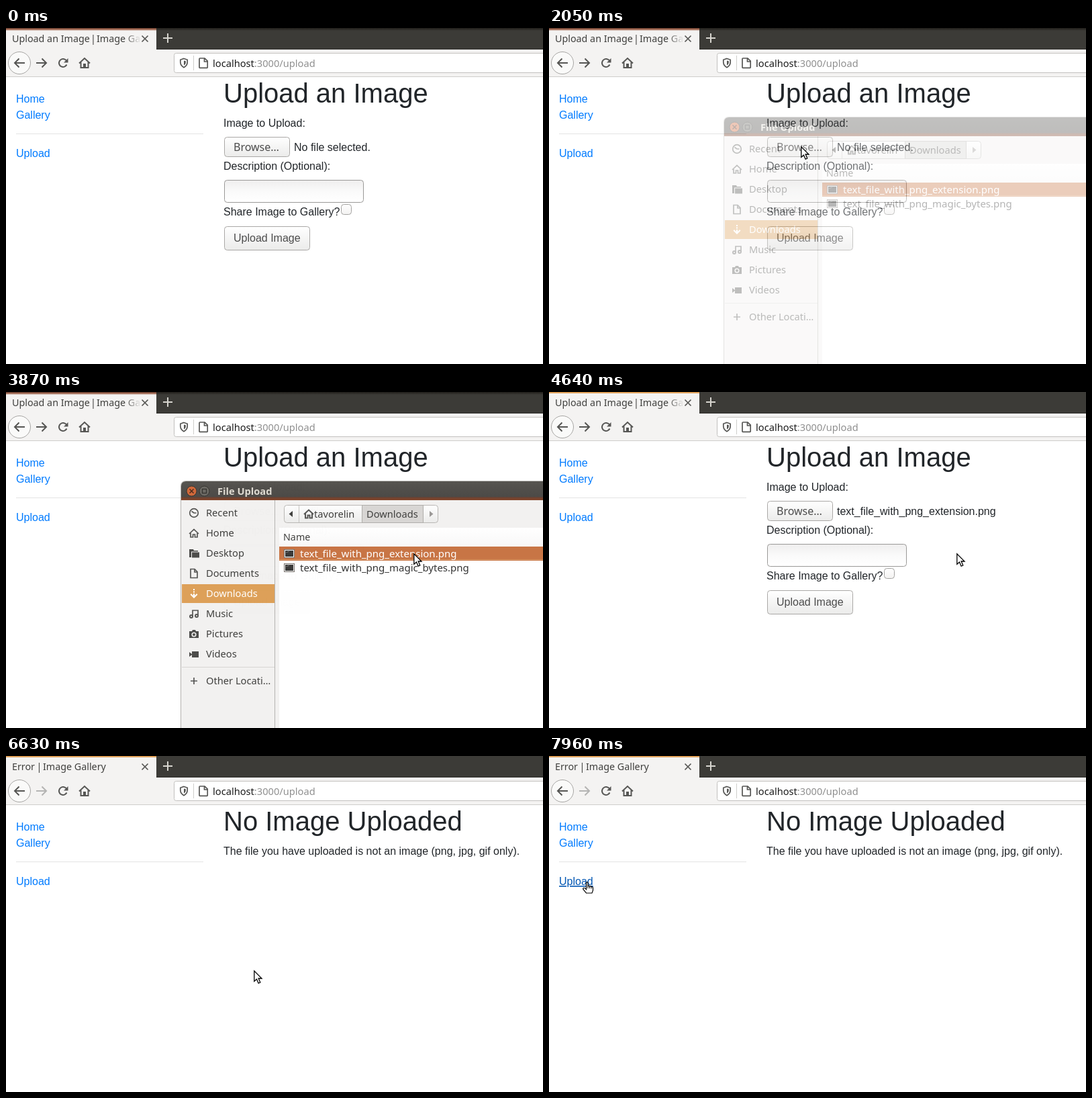
An HTML page that plays this animation: 800 by 500 pixels, repeating every 8000 ms.

```html
<!DOCTYPE html>
<html lang="en">
<head>
<meta charset="utf-8">
<title>Upload an Image</title>
<style>
  html, body { margin: 0; width: 100%; height: 100%; overflow: hidden; background: #fff; }
  svg { display: block; width: 100vw; height: 100vh; }
  text { font: 16px "Liberation Sans", Arial, sans-serif; fill: #212529; white-space: pre; }
  .ui text, text.ui { font: 14.65px "Noto Sans", "Open Sans", sans-serif; fill: #3f3f3d; }
  .ui .tab { font-size: 14.3px; }
  .ui .file { font-size: 15px; fill: #333; }
  .ui .light { fill: #fff; }
  .ui .heading { font-weight: bold; fill: #dfdbd2; }
  text.browse { font-size: 16px; fill: #4c4c4c; }
  text.h1 { font-size: 40px; }
  .link { fill: #007bff; }
  .link.hover { fill: #0056b3; text-decoration: underline; }
  .line { fill: none; stroke: #565654; stroke-width: 2; }
  .thin { stroke-width: 1.7; }
</style>
</head>
<body>
<svg viewBox="0 0 800 500">
  <defs>
    <linearGradient id="button" x2="0" y2="1"><stop stop-color="#fff"/><stop offset="1" stop-color="#ebebea"/></linearGradient>
    <linearGradient id="hover" x2="0" y2="1"><stop stop-color="#fff"/><stop offset="1" stop-color="#f3f2f1"/></linearGradient>
    <linearGradient id="pressed" x2="0" y2="1"><stop stop-color="#d2d1d0"/><stop offset="1" stop-color="#e2e1e0"/></linearGradient>
    <linearGradient id="field" x2="0" y2="1"><stop stop-color="#efeeee"/><stop offset=".5" stop-color="#fafafa"/><stop offset="1" stop-color="#fff"/></linearGradient>
    <linearGradient id="fade"><stop stop-color="#f4f3f2" stop-opacity="0"/><stop offset="1" stop-color="#f4f3f2"/></linearGradient>
    <linearGradient id="dim" x2="0" y2="1"><stop stop-color="#5c3a2e"/><stop offset=".5" stop-color="#a4654c"/><stop offset="1" stop-color="#e4dcd8"/></linearGradient>
    <linearGradient id="shade" x2="0" y2="1"><stop stop-color="#1f1d19"/><stop offset="1" stop-color="#3c3b37"/></linearGradient>
    <linearGradient id="header" x2="0" y2="1"><stop stop-color="#fff"/><stop offset="1" stop-color="#f8f7f7"/></linearGradient>
    <linearGradient id="titlebar" x2="0" y2="1"><stop stop-color="#55534f"/><stop offset=".8" stop-color="#4b4946"/><stop offset=".88" stop-color="#70402c"/><stop offset="1" stop-color="#84452c"/></linearGradient>
  </defs>
  <rect width="800" height="500" fill="#fff"/>

  <!-- browser window -->
  <g class="ui">
    <rect width="800" height="33" fill="#3c3b37"/>
    <rect y="31" width="800" height="1" fill="#2d2c29"/>
    <path d="M0 0H224V32H800V72H0Z" fill="#f4f3f2"/>
    <path d="M0 72.5H800" stroke="#cfcdcb"/>
    <rect id="accent" width="224" height="2" fill="#e0a15a"/>
    <g id="unfocused">
      <rect width="224" height="4" fill="url(#dim)"/>
      <rect x="224" width="576" height="4" fill="url(#shade)"/>
    </g>
    <g id="uploadTitle">
      <text class="tab" x="9" y="21">Upload an Image</text>
      <text class="tab" x="130" y="21" text-anchor="middle">|</text>
      <text class="tab" x="135" y="21">Image Ga</text>
      <rect x="176" y="6" width="25" height="22" fill="url(#fade)"/>
    </g>
    <g id="loadingTitle">
      <circle id="throbber" cy="16" r="2" fill="#5e5e5c"/>
      <text x="31" y="21">localhost:3000/upload</text>
    </g>
    <g id="errorTitle">
      <text class="tab" x="9" y="21">Error</text>
      <text class="tab" x="49.5" y="21" text-anchor="middle">|</text>
      <text class="tab" x="55" y="21">Image Gallery</text>
    </g>
    <path d="M202.5 11.5l9 9m0-9l-9 9" class="line thin"/>
    <path d="M234 15H248M241 8V22" class="line" style="stroke:#d6d4ce"/>

    <circle cx="20" cy="52" r="16.5" fill="#fafaf9" stroke="#a7a6a4"/>
    <path class="line" d="M28 52H13M19.5 45.5L13 52l6.5 6.5"/>
    <path id="forward" class="line" d="M45 52H60M53.5 45.5L60 52l-6.5 6.5"/>
    <g id="reload">
      <circle id="ring" class="line" cx="85" cy="52" r="6" pathLength="100"/>
      <path id="reloadTip" d="M92.5 45V51.5H86Z" fill="#565654"/>
    </g>
    <path class="line" d="M109 52.5L117 45l8 7.5M111.5 51V59H122.5V51"/>
    <rect x="115" y="53" width="4" height="6" fill="#565654"/>

    <rect x="250.5" y="37.5" width="560" height="29" rx="3" fill="#fff" stroke="#c2c0be"/>
    <path class="line thin" d="M265 45.5L270.2 47.3V51Q270 56 265 58.7Q260 56 259.8 51V47.3Z"/>
    <path d="M265 48.5L267.8 49.3V52Q267.5 54 265 55.7Z" fill="#565654"/>
    <path d="M279.5 41V63" stroke="#cfcecc"/>
    <path class="line thin" d="M289 45H296L300.2 49.2V58.5Q300.2 59.3 299.4 59.3H288.7Q288 59.3 288 58.5V46Q288 45 289 45M295.5 45V50H300"/>
    <text x="308" y="58" style="fill:#1b1b1b">localhost<tspan fill="#8f8f8f">:3000/upload</tspan></text>
  </g>

  <!-- page -->
  <text class="link" x="15" y="111">Home</text>
  <text class="link" x="15" y="135">Gallery</text>
  <path d="M15 157.5H294" stroke="#e4e4e4"/>
  <text id="uploadLink" class="link" x="15" y="192">Upload</text>

  <g id="form">
    <text class="h1" x="324" y="111">Upload an Image</text>
    <text x="324" y="147">Image to Upload:</text>
    <rect id="browse" x="325.5" y="162.5" width="97" height="29" rx="4" stroke="#aaa8a6"/>
    <text class="ui browse" x="339" y="183">Browse…</text>
    <text id="fileName" x="429" y="183"></text>
    <text x="324" y="211">Description (Optional):</text>
    <rect x="325.5" y="226.5" width="207" height="33" rx="4" fill="url(#field)" stroke="#9a9997"/>
    <text x="324" y="279">Share Image to Gallery?</text>
    <rect x="499.5" y="262.5" width="15" height="15" rx="4" fill="url(#hover)" stroke="#a3a2a0"/>
    <rect id="submit" x="325.5" y="295.5" width="127" height="35" rx="4"/>
    <text x="339" y="318" style="fill:#4c4c4c">Upload Image</text>
  </g>
  <g id="error">
    <text class="h1" x="324" y="111">No Image Uploaded</text>
    <text x="324" y="147">The file you have uploaded is not an image (png, jpg, gif only).</text>
  </g>

  <!-- file dialog -->
  <g id="dialog" class="ui">
    <path d="M260.5 510V140Q260.5 132.5 268 132.5H810V510Z" fill="#f2f1f0" stroke="#b5b3b0"/>
    <path d="M261 161V140Q261 133 268 133H800V161Z" fill="url(#titlebar)"/>
    <circle cx="276.5" cy="147.5" r="7.5" fill="#d0683a" stroke="#35332f"/>
    <path d="M273.5 144.5l6 6m0-6l-6 6" stroke="#4a2a1c" stroke-width="1.5"/>
    <circle cx="295.5" cy="147.5" r="7.5" fill="#6b6963" stroke="#35332f"/>
    <rect x="292.5" y="144.5" width="6" height="6" fill="none" stroke="#33322e" stroke-width="1.3"/>
    <text class="heading" x="315" y="153">File Upload</text>
    <rect x="262" y="286" width="138" height="28" fill="#dda058"/>
    <path d="M400.5 161V500" stroke="#b6b4b1"/>
    <path d="M262 409.5H400" stroke="#d8d6d4"/>
    <g id="places"></g>

    <rect x="414.5" y="168.5" width="229" height="26" rx="4" fill="url(#button)" stroke="#b9b7b4"/>
    <rect x="530.5" y="168.5" width="91" height="26" fill="#d8d6d4" stroke="#b0aeab"/>
    <path d="M436.5 169V194" stroke="#c6c4c1"/>
    <path d="M427 177V186L421.5 181.5Z" fill="#3f3f3d"/>
    <path d="M631 177V186L636.5 181.5Z" fill="#9b9997"/>
    <path class="line" d="M444 182L451 175.5l7 6.5M446 180.5V187.5H449.5V183.5H452.5V187.5H456V180.5"/>
    <text x="459" y="187">tavorelin</text>
    <text x="537" y="187">Downloads</text>

    <rect x="407" y="202" width="393" height="298" fill="#fff"/>
    <rect x="407" y="202" width="393" height="28" fill="url(#header)"/>
    <text class="tab" x="413" y="221">Name</text>
    <rect x="407" y="230" width="393" height="21" fill="#c87444"/>
    <path d="M407 249.5H800" stroke="#d99a66"/>
    <g id="files"></g>
  </g>

  <g id="arrow"><path d="M.8 .8V16.3L4.5 13L7.1 19.2L9.8 18L7.2 12H12Z" fill="#fff" stroke="#000" stroke-width="1.3"/></g>
  <g id="hand">
    <path d="M5.5 10V1.8Q5.5 .6 6.7 .6Q8 .6 8 1.8V6.5Q9.5 5.5 10.5 7Q12 6 13 7.6Q15.5 7 15.5 9.5V13L14 17H5.5L1 11.5Q.2 10 1.7 9.3Q3 8.8 5.5 11.5Z" fill="#fff" stroke="#000" stroke-width="1.2"/>
    <path d="M8 6.5V10M10.5 7V10M13 8V10.5" stroke="#000"/>
  </g>
</svg>
<script>
const LOOP = 8000;
const $ = id => document.getElementById(id);
const show = (id, on) => { $(id).style.display = on ? '' : 'none'; };
const clamp = v => Math.max(0, Math.min(1, v));
const between = (t, a, b) => t >= a && t < b;

// Sidebar icons are drawn around (0, 0).
const outline = d => `<path class="line thin" d="${d}"/>`;
const solid = d => `<path d="${d}" fill="#4c4c4a"/>`;
const places = [
  ['Recent', '<circle class="line thin" r="6.3"/>' + outline('M-3.5 -2.5L0 0H3.5')],
  ['Home', outline('M-7 1L0 -5.5L7 1M-5 0V6H-1.5V2H1.5V6H5V0')],
  ['Desktop', solid('M-7 -6H-1L0 -4H6V-2.5H-4V6H-7ZM-3 -1.5H8V6.5H-3Z')],
  ['Documents', outline('M-5 -6.5H1L5 -2.5V6.5H-5ZM1 -6V-2H5')],
  ['Downloads', '<path d="M-1 -7H1V-5H-1ZM-1 -3.5H1V-1.5H-1ZM-1 0H1V3L4 0L5.500 1.500L0 7L-5.500 1.500L-4 0L-1 3Z" fill="#fff"/>'],
  ['Music', outline('M-2 4V-5H6V3') + '<g class="line"><circle cx="-4" cy="4" r="2"/><circle cx="4" cy="3" r="2"/></g>'],
  ['Pictures', solid('M-7 -4H-3L-2 -6H2L3 -4H7V6H-7Z') + '<circle cy="1" r="2.8" fill="#4c4c4a" stroke="#f2f1f0" stroke-width="1.6"/>'],
  ['Videos', solid('M-3 -4H7V5H-3ZM-7 -3L-3 0V1L-7 4Z')],
  ['Other Locati…', outline('M-5 0H5M0 -5V5')],
];
$('places').innerHTML = places.map(([name, icon], i) => {
  const y = 180 + 30 * i + (i === 8 ? 10 : 0);
  return `<g transform="translate(280 ${y})">${icon}</g>
    <text x="298" y="${y + 5}" class="${name === 'Downloads' ? 'light' : ''}">${name}</text>`;
}).join('');

const files = ['text_file_with_png_extension.png', 'text_file_with_png_magic_bytes.png'];
$('files').innerHTML = files.map((name, i) => {
  const y = 235 + 21 * i;
  return `<rect x="414.5" y="${y - .5}" width="15" height="12" fill="#f5f5f5" stroke="#77726d"/>
    <rect x="416" y="${y + 1}" width="12" height="9" fill="#393938"/>
    <path d="M417 ${y + 4}l5 -2" stroke="#777"/>
    <text x="438" y="${y + 11}" class="file ${i ? '' : 'light'}">${name}</text>`;
}).join('');

// Pointer path: time, x, y
const pointer = [
  [780, 800, 423], [960, 600, 318], [1140, 440, 222], [1250, 388, 184], [1360, 375, 176],
  [2350, 375, 176], [2460, 443, 219], [2590, 550, 260], [2690, 594, 250], [2780, 607, 240],
  [4670, 607, 240], [4780, 520, 265], [4930, 410, 303], [5080, 369, 316],
  [5730, 369, 316], [5780, 369, 319], [6750, 369, 319], [6920, 390, 290], [7090, 403, 272],
  [7340, 403, 272], [7520, 290, 245], [7720, 130, 205], [7860, 72, 190], [7960, 56, 188],
];
function pointerAt(t) {
  const next = pointer.findIndex(p => p[0] > t);
  if (next < 0) return pointer.at(-1).slice(1);
  if (!next) return pointer[0].slice(1);
  const [t0, x0, y0] = pointer[next - 1], [t1, x1, y1] = pointer[next];
  const k = (t - t0) / (t1 - t0);
  return [x0 + (x1 - x0) * k, y0 + (y1 - y0) * k];
}

function draw(t) {
  const unfocused = t < 780 || between(t, 1940, 3930);
  const loading = between(t, 5880, 6080), loaded = t >= 6080;
  show('unfocused', unfocused);
  show('accent', !unfocused);
  show('uploadTitle', t < 5880);
  show('loadingTitle', loading);
  show('errorTitle', loaded);
  show('form', !loaded);
  show('error', loaded);
  $('throbber').setAttribute('cx', 18 - 5.5 * Math.cos((t - 5990) / 167));

  $('forward').style.opacity = t < 5880 ? 1 : .4;
  $('reload').style.opacity = between(t, 6080, 6630) ? .5 : 1;
  show('reloadTip', t < 5880 || t >= 6340);
  const busy = between(t, 5880, 6400);
  const arc = loading ? 78 - 60 * clamp((t - 6010) / 70) : loaded ? 18 + 64 * clamp((t - 6080) / 320) : 82;
  $('ring').setAttribute('stroke-dasharray', `${arc} 100`);
  $('ring').setAttribute('transform', `rotate(${busy ? 130 : 25} 85 52)`);

  $('fileName').textContent = t < 3930 ? 'No file selected.' : files[0];
  const browse = between(t, 1800, 1940) ? 'pressed' : between(t, 1340, 4640) ? 'hover' : 'button';
  $('browse').setAttribute('fill', `url(#${browse})`);
  const submit = between(t, 5740, 5840) ? 'pressed' : t >= 5040 ? 'hover' : 'button';
  $('submit').setAttribute('fill', `url(#${submit})`);
  $('submit').setAttribute('stroke', t >= 5740 ? '#c9793f' : '#aaa8a6');

  const opacity = Math.min(clamp((t - 1980) / 200), clamp((4000 - t) / 130));
  show('dialog', opacity > 0);
  $('dialog').style.opacity = opacity;

  const [x, y] = pointerAt(t), overLink = t > 7870;
  show('arrow', t >= 780 && !overLink);
  show('hand', overLink);
  $('arrow').setAttribute('transform', `translate(${x} ${y})`);
  $('hand').setAttribute('transform', `translate(${x - 6} ${y - 1})`);
  $('uploadLink').classList.toggle('hover', overLink);
}

const start = performance.now();
function frame() {
  draw((performance.now() - start) % LOOP);
  requestAnimationFrame(frame);
}
frame();
</script>
</body>
</html>
```
